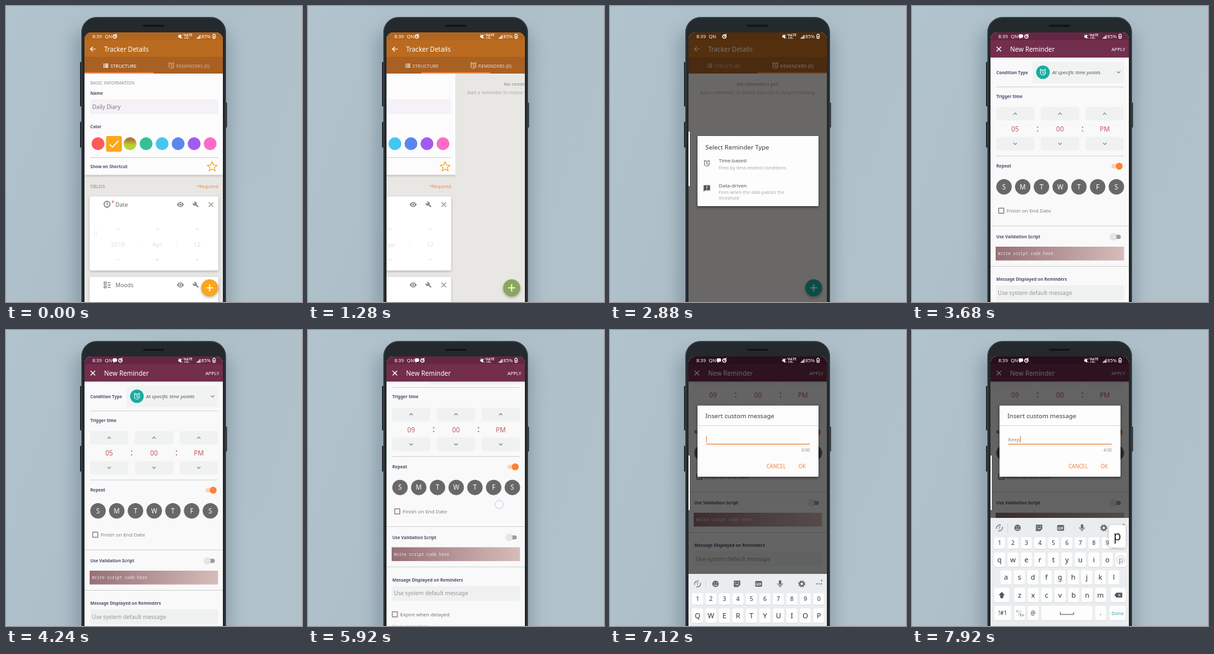
An HTML page for the animation above (8000 ms loop, 460 px wide and 460 px high).

```html
<!DOCTYPE html>
<html lang="en">
<head>
<meta charset="utf-8">
<title>Reminder setup</title>
<style>
html, body { margin: 0; width: 100%; height: 100%; overflow: hidden; background: #b0c1cb; }
svg { display: block; width: 100vw; height: 100vh; }
text { font-family: "Noto Sans", "Open Sans", sans-serif; white-space: pre; }
.mono { font-family: "Noto Sans Mono", "DejaVu Sans Mono", monospace; }
</style>
</head>
<body>
<svg id="stage" viewBox="0 0 460 460"></svg>
<script>
const LOOP = 8000, STEP = 80;
const DAYS = [..."SMTWTFS"];
const SWATCHES = ["#fc5a58", "#fca71c", "url(#lime)", "#35c09a", "#45c6f0", "#5b87ec", "#a05bf0", "#fc6cc4"];

// ---- drawing helpers ----
const text = (x, y, s, size, fill, more = "") =>
  `<text x="${x}" y="${y}" font-size="${size}" fill="${fill}" ${more}>${s}</text>`;
const mid = 'text-anchor="middle"';
const bold = 'font-weight="600"';
const box = (x, y, w, h, fill, r = 0, more = "") =>
  `<rect x="${x}" y="${y}" width="${w}" height="${h}" rx="${r}" fill="${fill}" ${more}/>`;
const dot = (x, y, r, fill, more = "") =>
  `<circle cx="${x}" cy="${y}" r="${r}" fill="${fill}" ${more}/>`;
const line = (d, color, w = 1, more = "") =>
  `<path d="${d}" fill="none" stroke="${color}" stroke-width="${w}" ${more}/>`;
const at = (x, y, inner, more = "") => `<g transform="translate(${x} ${y})" ${more}>${inner}</g>`;
const rule = (y, x1 = 131, x2 = 329) => line(`M${x1} ${y}H${x2}`, "#d2d2d2", 1);
const label = (y, s) => text(131, y, s, 6.6, "#4b506c", bold);

const alarm = (x, y, c) => at(x, y,
  line("M-4.5-3.2L-2.4-5M4.5-3.2L2.4-5M0-2V.7L2 2", c, 1.1) + dot(0, .4, 3.9, "none", `stroke="${c}" stroke-width="1.1"`));
const clock = (x, y) => at(x, y, dot(0, 0, 4.6, "none", 'stroke="#555" stroke-width="1.2"') + line("M0-3V.3L2 1.7", "#555"));
const eye = (x, y) => at(x, y,
  '<path d="M-5.6 0Q0-8 5.6 0Q0 8-5.6 0Z" fill="#8a8a8a"/>' + dot(0, 0, 2.5, "#fff") + dot(0, 0, 1.5, "#8a8a8a"));
const wrench = (x, y) => at(x, y,
  line("M-1-1L3.8 3.8", "#8a8a8a", 2) + '<path d="M-4.5-2.8L-2.6-1-1.2-2.4-3-4.3A3.2 3.2 0 1 1-4.5-2.8Z" fill="#8a8a8a"/>');
const cross = (x, y, r, c, w = 1.2) => line(`M${x - r} ${y - r}l${2 * r} ${2 * r}m0 ${-2 * r}l${-2 * r} ${2 * r}`, c, w);
const chevron = (x, y, up, c = "#777") => line(`M${x - 2.6} ${y + (up ? 1.3 : -1.3)}l2.6 ${up ? -2.6 : 2.6}l2.6 ${up ? 2.6 : -2.6}`, c, 1.1);
const check = (x, y) => box(x, y, 8, 8, "none", .6, 'stroke="#777" stroke-width="1.2"');

// ---- screens ----
function device() {
  return `<rect width="460" height="460" fill="url(#wall)"/>
    ${box(104, 34, 246, 460, "#5f7380", 26, 'opacity=".4" filter="url(#blur)"')}
    ${box(115, 87, 4, 69, "#22292c", 1)}${box(115, 180, 4, 40, "#22292c", 1)}${box(340, 150, 3.4, 39, "#22292c", 1)}
    ${box(117.5, 17.5, 224, 480, "#282f32", 23, 'stroke="#414a4e"')}
    ${box(119.5, 20, 220, 480, "#23292c", 20)}
    ${box(213, 29.2, 33, 3, "#0f1416", 1.5)}`;
}

function structure() {
  const swatch = (c, i) => {
    const x = 143 + 24.9 * i;
    return i === 1
      ? box(155.5, 202, 24.5, 24.5, c, 3) + line("M161 215l4.4 4.4 9.6-10", "#fff", 1.6)
      : dot(x, 214, 10, c);
  };
  const field = (y, h, icon, name) =>
    box(130, y, 200, h, "#000", 2, 'opacity=".22" filter="url(#soft)" transform="translate(0 1.5)"') +
    box(130, y, 200, h, "#fff", 2) + icon + text(170, y + 15.5, name, 8.8, "#6a6a6a") +
    eye(271, y + 12.5) + wrench(295, y + 12.5) + cross(318.5, y + 12.5, 3.6, "#8a8a8a");
  const wheel = (x, s) => text(x, 374, s, 9.6, "#dedede", mid) +
    chevron(x, 347, true, "#e2e2e2") + chevron(x, 394, false, "#e2e2e2");
  const list = [-3, 0, 3].map(d => line(`M158 ${433.5 + d * 1.15}h4.5`, "#555", 1.1)).join("") +
    box(152.5, 429, 3.2, 3.2, "none", 0, 'stroke="#555" stroke-width=".9"') +
    box(152.5, 434.8, 3.2, 3.2, "none", 0, 'stroke="#555" stroke-width=".9"');
  const grip = [0, 1, 2, 3].map(i => dot(137.5, 349 + 3 * i, .7, "#ddd") + dot(140.5, 349 + 3 * i, .7, "#ddd")).join("");
  return box(122, 105, 215, 360, "#e9e7e4") +
    box(122, 105, 215, 158, "#000", 0, 'opacity=".3" filter="url(#soft)"') +
    box(122, 105, 215, 157.5, "#fcfcfc") +
    text(131, 121.5, "BASIC INFORMATION", 6.9, "#8b8b8b") + label(137.5, "Name") +
    box(131, 145, 199, 23, "#f5f1f8", 2) + text(134, 160, "Daily Diary", 8.7, "#777") +
    label(190, "Color") + SWATCHES.map(swatch).join("") + rule(235.5, 131, 330) +
    label(251.5, "Show on Shortcut") +
    at(320.5, 249.5, line("M0-7.5L2.2-2.4 7.4-2 3.4 1.6 4.7 6.8 0 4 -4.7 6.8-3.4 1.6-7.4-2-2.2-2.4Z", "#f9a52c", 1.2)) +
    text(131, 282.5, "FIELDS", 7.1, "#8b8b8b") +
    text(330, 282.5, "*Required", 7, "#fb8440", 'text-anchor="end"') +
    field(296, 115, clock(157, 308) + text(163.5, 309, "*", 9, "#f2552c"), "Date") + grip +
    wheel(174, "2019") + wheel(235, "Apr") + wheel(297, "12") +
    dot(204.5, 373, .8, "#ddd") + dot(265, 373, .8, "#ddd") +
    field(421, 80, list, "Moods");
}

function tracker() {
  const bars = [0, 1, 2].map(i => box(151.5, 89.6 + 2.3 * i, 1.6, 1.6, "#fff") + box(153.8, 89.6 + 2.3 * i, 5.2, 1.6, "#fff")).join("");
  return box(122, 41, 215, 424, "#e9e7e3") +
    `<g id="pager"><g>${structure()}</g>` + at(215, 0,
      box(122, 105, 215, 360, "#e9e7e3") +
      text(230, 123.5, "No reminders yet.", 7.4, "#a9a8a6", mid + bold) +
      text(230, 136.8, "Add a reminder to notice you not to forget tracking.", 7.45, "#a9a8a6", mid + ' font-weight="500"')) + "</g>" +
    box(122, 41, 215, 64, "#ba6b20") + box(122, 41, 215, 12, "#b2651d") + box(122, 79, 215, 26, "#a86023") +
    line("M139.5 67H131.5M135 63.3L131.3 67 135 70.7", "#fff", 1.2) +
    text(152.5, 70.7, "Tracker Details", 10, "#fff") +
    `<g id="tabA">${bars}${text(162.3, 95.6, "STRUCTURE", 7.3, "#fff")}</g>
     <g id="tabB">${alarm(257, 92.5, "#fff")}${text(264.6, 95.6, "REMINDERS (0)", 7.3, "#fff")}</g>` +
    box(122, 103.2, 107.5, 1.8, "#ff8a48", 0, 'id="mark"') +
    dot(316.5, 440, 13, "#000", 'opacity=".3" filter="url(#soft)"') +
    dot(316.5, 438, 13.2, "#fca61a") + dot(316.5, 438, 13.2, "#17aca1", 'id="fab"') +
    line("M311 438h11M316.5 432.5v11", "#fff", 1.7);
}

function panel(y, h, inner) {
  return box(136, y, 188, h, "#000", 1, 'opacity=".45" filter="url(#soft)" transform="translate(0 2)"') +
    box(136, y, 188, h, "#fdfdfd", 1) + inner;
}

function typeDialog() {
  return panel(202, 109,
    text(148.3, 222.5, "Select Reminder Type", 9.8, "#3c3c3c") +
    box(136, 229, 188, 32, "#e2e2e2", 0, 'id="pick"') +
    alarm(150.5, 244.5, "#666") + text(169, 243, "Time-based", 7.9, "#555") +
    text(169, 253.7, "Fires by time-related conditions", 7.1, "#a9a9a0") +
    '<path d="M145.5 278.5h10v8h-7.8l-2.2 2.2Z" fill="#555"/>' + line("M150.5 279.7v3.2m0 1v1.2", "#fff", 1.1) +
    text(169, 281.5, "Data-driven", 7.9, "#555") +
    text(169, 292, "Fires when the data passes the", 7.05, "#a9a9a0") + text(169, 300.5, "threshold", 7.05, "#a9a9a0"));
}

function reminder() {
  const button = (x, y, up, id = "") => box(x - 29.8, y, 59.6, 21, "#f0f2f2", 3, id) + chevron(x, y + 10.5, up);
  const wheel = (x, s, id) => button(x, 157, true, id === "hour" ? 'id="upKey"' : "") +
    text(x, 194.9, s, 10.4, "#c25a5e", `${mid} id="${id}"`) + button(x, 203.5, false);
  const colon = x => dot(x, 188.3, 1.1, "#b77") + dot(x, 194, 1.1, "#b77");
  const day = (d, i) => dot(143 + 29.1 * i, 281, 12, "#686868") + text(143 + 29.1 * i, 284.7, d, 10, "#fff", mid);
  const form =
    label(105.8, "Condition Type") + box(187, 86.5, 142.5, 33.5, "#f1f3f3", 3) + dot(203.5, 103, 10.6, "#18aca0") +
    alarm(203.5, 103, "#fff") + text(217.8, 106, "At specific time points", 7.8, "#555", 'font-style="italic"') +
    chevron(321, 103, false) + rule(125.8) +
    label(142.6, "Trigger time") + wheel(160.3, "05", "hour") + wheel(230, "00", "min") + wheel(299.5, "PM", "half") +
    colon(195.3) + colon(265) + rule(233) +
    label(251.2, "Repeat") + box(310, 245.8, 16, 6.4, "#fdd2ae", 3.2) + dot(322, 249, 5.4, "#fd8133") + DAYS.map(day).join("") +
    check(134.7, 314.2) + text(147, 321.2, "Finish on End Date", 7.9, "#808080") + rule(341.8, 122, 337) +
    label(361, "Use Validation Script") + box(309, 355.5, 15.5, 6.4, "#9c9c9c", 3.2) +
    dot(312.7, 358.7, 5.2, "#e6e6e6", 'stroke="#d2d2d2" stroke-width=".5"') +
    box(130, 374, 199.5, 21.5, "url(#code)") +
    text(133.6, 387, "Write script code here", 6.5, "#efe2e2", 'class="mono"') + rule(404.5, 122, 337) +
    label(427, "Message Displayed on Reminders") + box(130.5, 434, 199, 23, "#eff0f0", 3) +
    box(130.5, 434, 199, 23, "#cdcdcd", 3, 'id="press"') +
    text(133.6, 448.7, "Use system default message", 8.6, "#959595") +
    check(131, 474.2) + text(143.2, 481.2, "Expire when delayed", 7.9, "#757575") +
    text(131, 499.6, "Expiry time limit", 7.2, "#bdbdbd") +
    text(221, 530.5, "5", 17, "#c6c6c6", mid) + text(244.5, 527.5, "minute", 9.1, "#cacaca") + rule(537);
  return box(122, 41, 215, 424, "#f9f9f9") + `<g id="form">${form}</g>` +
    box(122, 79, 215, 2.5, "#000", 0, 'opacity=".12"') +
    box(122, 41, 215, 39, "#732e4d") + box(122, 41, 215, 12, "#652643") +
    cross(135, 67, 3.5, "#fff", 1.3) + text(152.5, 70.7, "New Reminder", 10, "#fff") +
    text(310, 69.8, "APPLY", 7.4, "#fff");
}

function messageDialog() {
  return panel(117.5, 110.5,
    text(148.3, 137, "Insert custom message", 9.75, "#3c3c3c") + line("M136 148.5H324", "#d8d8d8", .9) +
    text(149.3, 173, "", 7.8, "#8a8a8a", 'id="typed"') + line("M149.5 177.3H310.5", "#f3873c", 1.3) +
    box(167.6, 164.5, .9, 10.5, "#e2702c", 0, 'id="caret"') +
    text(310.5, 188.6, "0/30", 6.2, "#8a8a8a", 'text-anchor="end" id="count"') +
    text(243.3, 214.7, "CANCEL", 8, "#ee853f") + text(293, 214.7, "OK", 8, "#ee853f"));
}

const ROWS = [["1234567890", 136, 331, 9], ["qwertyuiop", 136, 357, 11], ["asdfghjkl", 146, 384.5, 11], ["zxcvbnm", 167.3, 412, 11]];
const keyPos = ch => {
  for (const [keys, x, y] of ROWS) if (keys.includes(ch)) return [x + 20.95 * keys.indexOf(ch), y];
};

function keyboard() {
  const key = (x, y, w, h, s, size, c = "#333", cls = "") =>
    box(x - w / 2, y - h / 2 + .8, w, h, "#cfd3d6", 3) + box(x - w / 2, y - h / 2, w, h, "#fdfdfd", 3) +
    text(x, y + size * .33, s, size, c, mid + cls);
  const letters = ROWS.map(([keys, , , size], row) => [...keys].map(ch => {
    const [x, y] = keyPos(ch);
    return key(x, y, 17.6, row ? 22.5 : 18, ch, size, "#333", row ? ' class="letter"' : "");
  }).join("")).join("");
  const gray = "#666";
  const tools =
    at(136, 307.5, line("M-4.5 1.5A5 5 0 0 1 2-4.5M4.5-1.5A5 5 0 0 1-2 4.5", gray, 1.1) + text(0, 2.5, "T", 7, gray, mid)) +
    line("M148.5 301v13", "#d0d3d5", .8) +
    dot(164, 307.5, 5, gray) + dot(162.2, 306, .8, "#fff") + dot(165.8, 306, .8, "#fff") + line("M161.3 308.8q2.7 3 5.4 0", "#fff", 1) +
    `<path d="M192.5 302.5h10v6.5l-3.5 3.5h-6.5Z" fill="${gray}"/>` + line("M195 308q2 2.5 5 0", "#fff", 1) + dot(195.5, 305.5, .8, "#fff") + dot(199.5, 305.5, .8, "#fff") +
    box(225.7, 303, 10.6, 9, gray, 1.5) + text(231, 309.5, "GIF", 5, "#fff", mid + ' font-weight="700"') +
    box(262.4, 301.8, 3.8, 7, gray, 1.9) + line("M260.5 306.5a3.8 3.8 0 0 0 7.6 0M264.3 310.3v2.8", gray, 1.1) +
    dot(298, 307.5, 3.1, "none", `stroke="${gray}" stroke-width="2.2"`) + dot(298, 307.5, 4.8, "none", `stroke="${gray}" stroke-width="1.5" stroke-dasharray="1.9 1.87"`) +
    [321.5, 325, 328.5].map(x => dot(x, 307.5, 1, gray)).join("") + dot(329, 302.3, 1.3, "#f27a3c");
  return box(122, 292, 215, 172, "#eaedef") + tools + letters +
    key(139.5, 412, 23, 22.5, "", 9) + line("M139.5 407.5l4 4.3h-2.2v4.4h-3.6v-4.4h-2.2Z", "#555", 1, 'style="fill:#555"') +
    key(320.5, 412, 23, 22.5, "", 9) + '<path d="M314.5 412l3.2-3.8h9v7.6h-9Z" fill="#555"/>' + cross(322.3, 412, 1.7, "#fff", .9) +
    key(141, 440, 27, 22.5, "!#1", 9) + key(167.3, 440, 17.6, 22.5, "", 9) +
    text(164.2, 438.5, "Ki", 5.5, "#888", mid) + line("M164.5 444l5.5-8", "#999", .7) + text(171, 444.8, "En", 5.8, "#555", mid) +
    key(188.2, 440, 17.6, 22.5, "@", 8.5) + key(240.7, 440, 80, 22.5, "", 9) + line("M230.5 438.5v3.5h20.5v-3.5", "#555", 1.1) +
    key(293, 440, 17.6, 22.5, ".", 10) + key(319.5, 440, 26, 22.5, "Done", 7.6, "#3aa0bd") +
    `<g id="pop">${box(-13, -53, 26, 35, "#000", 4, 'opacity=".25" filter="url(#soft)"')}${box(-13, -54, 26, 35, "#fff", 4)}
      ${text(0, -30, "", 19, "#222", mid + ' id="popChar"')}</g>`;
}

function status() {
  const w = "#fff";
  const tag = (x, s) => text(x, 50, s, 7.4, w);
  return tag(134.3, "8:39") + tag(153.6, "QN") +
    `<g id="chat">${box(165.6, 44, 7, 5.4, w, 2)}<path d="M167 49v2.2l2.2-2Z" fill="#fff"/></g>
     <g id="ring">${dot(0, 0, 2.7, "none", 'stroke="#fff" stroke-width="1.4"')}${dot(.6, -.3, 1, w)}${line("M1-3l2.6-.6", w, 1)}</g>` +
    '<path d="M267.8 46h1.7l2.4-2v7l-2.4-2h-1.7Z" fill="#fff"/>' + line("M268 44l6.2 6.5M274.2 44.5l-2 2", w, .9) +
    text(276, 47, "VoLTE", 4.6, w, bold) + text(277, 51, "LTE+", 3.6, w, bold) +
    [0, 1, 2, 3].map(i => box(296.3 + 1.6 * i, 49.5 - 1.5 * i, 1.1, 1.5 + 1.5 * i, w)).join("") +
    tag(303.6, "85%") + box(321.4, 44.3, 4, 6.2, "none", .8, 'stroke="#fff" stroke-width="1"') + box(322.4, 43.2, 2, 1, w) + box(322.7, 46.5, 1.4, 3, w);
}

const stage = document.getElementById("stage");
stage.innerHTML = `<defs>
  <linearGradient id="wall" x2="1" y2=".35"><stop stop-color="#b1c3cd"/><stop offset=".5" stop-color="#adbec8"/><stop offset="1" stop-color="#b1c1ca"/></linearGradient>
  <linearGradient id="code"><stop stop-color="#967077"/><stop offset="1" stop-color="#d6bcb9"/></linearGradient>
  <linearGradient id="lime" x2="0" y2="1"><stop offset=".2" stop-color="#b07a38"/><stop offset=".6" stop-color="#b9d334"/></linearGradient>
  <filter id="blur" x="-30%" y="-30%" width="160%" height="160%"><feGaussianBlur stdDeviation="11"/></filter>
  <filter id="soft" x="-30%" y="-30%" width="160%" height="160%"><feGaussianBlur stdDeviation="2"/></filter>
  <clipPath id="glass"><rect x="122" y="41" width="215" height="440" rx="11"/></clipPath>
</defs>${device()}
<g clip-path="url(#glass)">
  <g id="tracker">${tracker()}</g>
  ${box(122, 41, 215, 424, "#000", 0, 'id="dimA"')}
  <g id="types">${typeDialog()}</g>
  <g id="reminder">${reminder()}</g>
  ${box(122, 41, 215, 424, "#000", 0, 'id="dimB"')}
  <g id="message">${messageDialog()}</g>
  <g id="keys">${keyboard()}</g>
  ${status()}
  ${box(121, 195, 3, 85, "#fff", 1, 'id="edge"')}
</g>
<g id="touch">${dot(0, 0, 6.2, "#fff", 'fill-opacity=".5" stroke="#c2bbdf" stroke-width="1"')}</g>`;

// ---- motion ----
const $ = id => document.getElementById(id);
const set = (id, name, value) => $(id).setAttribute(name, value);
const fade = (id, v) => { set(id, "opacity", v); set(id, "visibility", v > 0 ? "visible" : "hidden"); };
const move = (id, x, y) => set(id, "transform", `translate(${x} ${y})`);
const ramp = (t, a, b) => Math.min(1, Math.max(0, (t - a) / (b - a)));
const smooth = u => u * u * (3 - 2 * u);
const out = u => 1 - (1 - u) ** 3;
const within = (t, a, b) => t >= a && t < b;

const HOUR_TAPS = [4480, 4640, 4800, 4960];
const TYPING = [["k", 7440], ["e", 7600], ["e", 7720], ["p", 7840]];
const letters = [...document.querySelectorAll(".letter")];
const lower = letters.map(n => n.textContent);

function render(t) {
  const page = smooth(ramp(t, 1120, 1440));
  move("pager", -215 * page, 0);
  set("mark", "x", 122 + 107.5 * page);
  set("tabA", "opacity", 1 - .5 * page);
  set("tabB", "opacity", .5 + .5 * page);
  set("fab", "opacity", page);

  const ask = out(ramp(t, 2120, 2400)) * (1 - ramp(t, 3120, 3320));
  fade("dimA", .55 * ask);
  fade("types", ask);
  fade("pick", within(t, 2960, 3200) ? 1 : 0);

  const enter = out(ramp(t, 3280, 3640));
  fade("reminder", enter);
  move("reminder", 0, 50 * (1 - enter));

  const scroll = 90 * smooth(ramp(t, 5615, 6315));
  move("form", 0, -scroll);
  $("hour").textContent = String(5 + HOUR_TAPS.filter(at => t >= at).length).padStart(2, "0");
  const tapping = HOUR_TAPS.some(at => within(t, at - 80, at + 40));
  set("upKey", "fill", tapping ? "#dadddd" : "#f0f2f2");
  fade("press", within(t, 6720, 6960) ? 1 : 0);

  const compose = out(ramp(t, 6900, 7160));
  fade("dimB", .6 * compose);
  fade("message", compose);
  const rise = out(ramp(t, 7060, 7360));
  fade("keys", rise > 0 ? 1 : 0);
  move("keys", 0, 170 * (1 - rise));

  const done = TYPING.filter(([, at]) => t >= at);
  const word = done.map(([ch], i) => i ? ch : ch.toUpperCase()).join("");
  $("typed").textContent = word;
  $("count").textContent = word.length + "/30";
  set("caret", "x", 149.5 + (word ? $("typed").getComputedTextLength() : 0));
  letters.forEach((n, i) => n.textContent = word ? lower[i] : lower[i].toUpperCase());

  const last = done[done.length - 1];
  const held = last && t < last[1] + 100 ? last[0] : "";
  fade("pop", held ? 1 : 0);
  if (held) {
    const [x, y] = keyPos(held);
    move("pop", Math.min(x, 319), y);
    $("popChar").textContent = word.slice(-1);
  }

  let finger = null;
  if (within(t, 960, 1120)) finger = [284, 92];
  else if (within(t, 1920, 2120)) finger = [321.5, 438];
  else if (within(t, 2960, 3120)) finger = [228, 247];
  else if (tapping) finger = [160, 168];
  else if (within(t, 5520, 6160)) finger = [297, 307.5 - scroll];
  else if (within(t, 6640, 6760)) finger = [232, 356];
  else if (held) finger = keyPos(held);
  fade("touch", finger ? .85 : 0);
  if (finger) move("touch", ...finger);

  fade("chat", t >= 3280 ? 1 : 0);
  move("ring", t < 2120 ? 169 : 177.8, 47.4);
  fade("edge", Math.max(ask, compose));
}

const start = performance.now();
function tick() {
  const t = (performance.now() - start) % LOOP;
  render(Math.floor(t / STEP) * STEP);
  requestAnimationFrame(tick);
}
tick();
</script>
</body>
</html>
```
